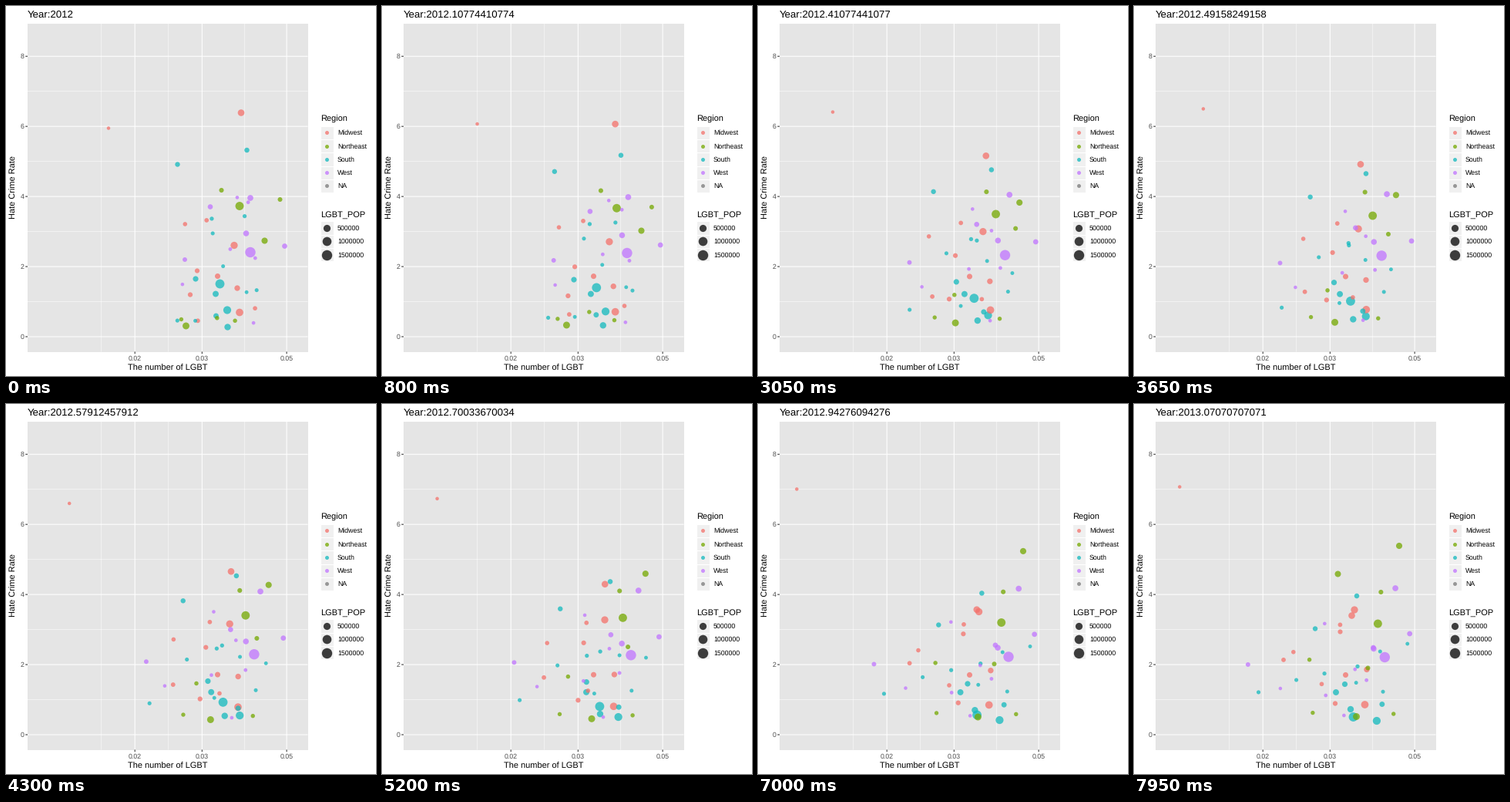
These frames come from a looping animation (480 px wide and 480 px high, 8 s). A matplotlib script:

```python
import numpy as np
import matplotlib.pyplot as plt
from matplotlib.animation import FuncAnimation
from matplotlib.patches import Rectangle

SIZE, FRAMES, STEP = 480, 160, 50
PT = 0.72                      # points per pixel at 100 dpi
YEAR_FRAMES = 148.5            # frames from one survey year to the next
ALPHA = 0.75
COLORS = {"Midwest": "#f4716b", "Northeast": "#74a800", "South": "#12b9be",
          "West": "#c074ff", "NA": "#7a7a7a"}
M, N, S, W = list(COLORS)[:4]

plt.rcParams["font.family"] = "Liberation Sans"
plt.rcParams["text.hinting"] = "none"

fig = plt.figure(figsize=(SIZE / 100, SIZE / 100), dpi=100, facecolor="white")
ax = fig.add_axes([0, 0, 1, 1])
ax.set_xlim(0, SIZE)
ax.set_ylim(SIZE, 0)
ax.axis("off")


def label(x, y, text, size, color="black", **kw):
    kw.setdefault("va", "baseline")
    return ax.text(x, y, text, fontsize=size * PT, color=color, **kw)


def line(xs, ys, width, color="white"):
    ax.plot(xs, ys, color=color, lw=width * PT, solid_capstyle="butt",
            zorder=1, snap=False)


def dots(x, y, r, color):
    area = (2 * np.asarray(r) * PT) ** 2
    return ax.scatter(x, y, s=area, color=color, alpha=ALPHA,
                      linewidths=0, zorder=3)


def x_pos(v):
    return 167.2 + 214.9 * np.log(v / 0.02)


def y_pos(v):
    return 429 - 45.47 * v


# Panel, grid and axes
LEFT, RIGHT, TOP, BOTTOM = 28, 391.5, 23, 448.5
ax.add_patch(Rectangle((LEFT, TOP), RIGHT - LEFT, BOTTOM - TOP,
                       fc="#e5e5e5", lw=0, zorder=0))
majors = [x_pos(v) for v in (0.02, 0.03, 0.05)]
half = (majors[1] - majors[0]) / 2
minors = [majors[0] - half, majors[0] + half, (majors[1] + majors[2]) / 2]
for x in minors:
    line([x, x], [TOP, BOTTOM], 0.53)
for v in (1, 3, 5, 7):
    line([LEFT, RIGHT], [y_pos(v)] * 2, 0.53)
for x, text in zip(majors, ("0.02", "0.03", "0.05")):
    line([x, x], [TOP, BOTTOM], 1.07)
    line([x, x], [BOTTOM, BOTTOM + 2.75], 1.07, "#333333")
    label(x, 460.2, text, 8.8, "#4d4d4d", ha="center")
for v in (0, 2, 4, 6, 8):
    y = y_pos(v)
    line([LEFT, RIGHT], [y, y], 1.07)
    line([LEFT - 2.75, LEFT], [y, y], 1.07, "#333333")
    label(23.2, y + 3, str(v), 8.8, "#4d4d4d", ha="right")
label(209.7, 472.8, "The number of LGBT", 11, ha="center")
label(15.4, 235.5, "Hate Crime Rate", 11, ha="right", va="center", rotation=90)
title = label(28, 14.7, "", 13.3)

# Legends
KEY = 17.28


def legend(heading, y, top, entries):
    label(407.6, y, heading, 11)
    for i, (name, color, r) in enumerate(entries):
        mid = top + KEY * (i + 0.5)
        ax.add_patch(Rectangle((407.6, mid - KEY / 2), KEY, KEY, fc="#f0f0f0",
                               ec="white", lw=1.07 * PT, zorder=0))
        dots([416.2], [mid], [r], color)
        label(430.1, mid + 3, name, 8.8)


legend("Region", 149.7, 155.7,
       [(name, color, 2.5) for name, color in COLORS.items()])
legend("LGBT_POP", 273.7, 279.4,
       [("500000", "black", 4.6), ("1000000", "black", 5.8),
        ("1500000", "black", 6.7)])

# Main points, largest first: region, start x, y, end x, y in pixels
MAIN = [
    (W, 317, 319.5, 325.5, 328.5), (S, 277.5, 360.5, 284.5, 406),
    (N, 303, 259.5, 316.5, 285), (S, 287, 394.5, 315, 411),
    (M, 303, 397.5, 299.5, 390), (M, 296, 310.5, 286, 267),
    (N, 233.5, 415, 288.5, 405.5), (M, 305, 138.5, 282.5, 274.5),
    (S, 287.5, 416.5, 281, 396), (N, 335.5, 304.5, 344.5, 184),
    (S, 272, 373.5, 262, 374), (W, 317, 249, 339.5, 239),
    (W, 311.5, 295, 311, 317.5), (M, 300, 366, 302, 344.5),
    (S, 246, 354, 273.5, 363.5), (M, 274.5, 350.5, 274.5, 351.5),
    (S, 272.5, 402, 322, 389.5), (W, 361.5, 311.5, 358.5, 298),
    (W, 265, 260.5, 310.5, 316), (S, 312.5, 187, 289, 249),
    (S, 222.5, 205.5, 235, 291.5), (M, 239, 374.5, 261, 388.5),
    (M, 248, 343.5, 267.5, 295.5), (N, 279.5, 239, 320.5, 244),
    (N, 355.5, 251, 303.5, 342.5), (W, 232, 329, 145.5, 338),
]
OUTLIER = (M, 133, 158.5, 45.3, 107.5)
MINOR_COUNTS = {M: 4, N: 3, S: 8, W: 6}


def minor_points(rng):
    """Small points: scattered at first, then gathering around one rate."""
    for region, count in MINOR_COUNTS.items():
        for _ in range(count):
            x, y = rng.uniform(220, 335), rng.uniform(236, 418)
            level = 345 + 0.3 * (y - 345)
            yield (region, x, y, x + rng.uniform(-80, 50),
                   level + rng.uniform(-50, 50))


points = MAIN + list(minor_points(np.random.default_rng(12))) + [OUTLIER]
paths = np.array([p[1:] for p in points])
start, end = paths[:, :2], paths[:, 2:]
rank = np.arange(1, len(points) + 1)
radius = 6.7 - 1.15 * np.log(rank)

# In the second year far outliers swing back towards the middle.
swing = np.zeros_like(end)
swing[:, 0] = 14 * ((270 - end[:, 0]) / 225) ** 3

cloud = dots(*start.T, radius, [COLORS[p[0]] for p in points])
newcomer = dots([263.5], [219.5], [4], COLORS[N])


def update(frame):
    year = frame / YEAR_FRAMES
    title.set_text(f"Year:{2012 + year:.15g}")
    late = max(0, frame - YEAR_FRAMES) / (FRAMES - 1 - YEAR_FRAMES)
    cloud.set_offsets(start + (end - start) * min(year, 1) + swing * late)
    newcomer.set_visible(year > 1)
    return title, cloud, newcomer


anim = FuncAnimation(fig, update, frames=FRAMES, interval=STEP,
                     repeat=True, repeat_delay=0)
plt.show()
```
